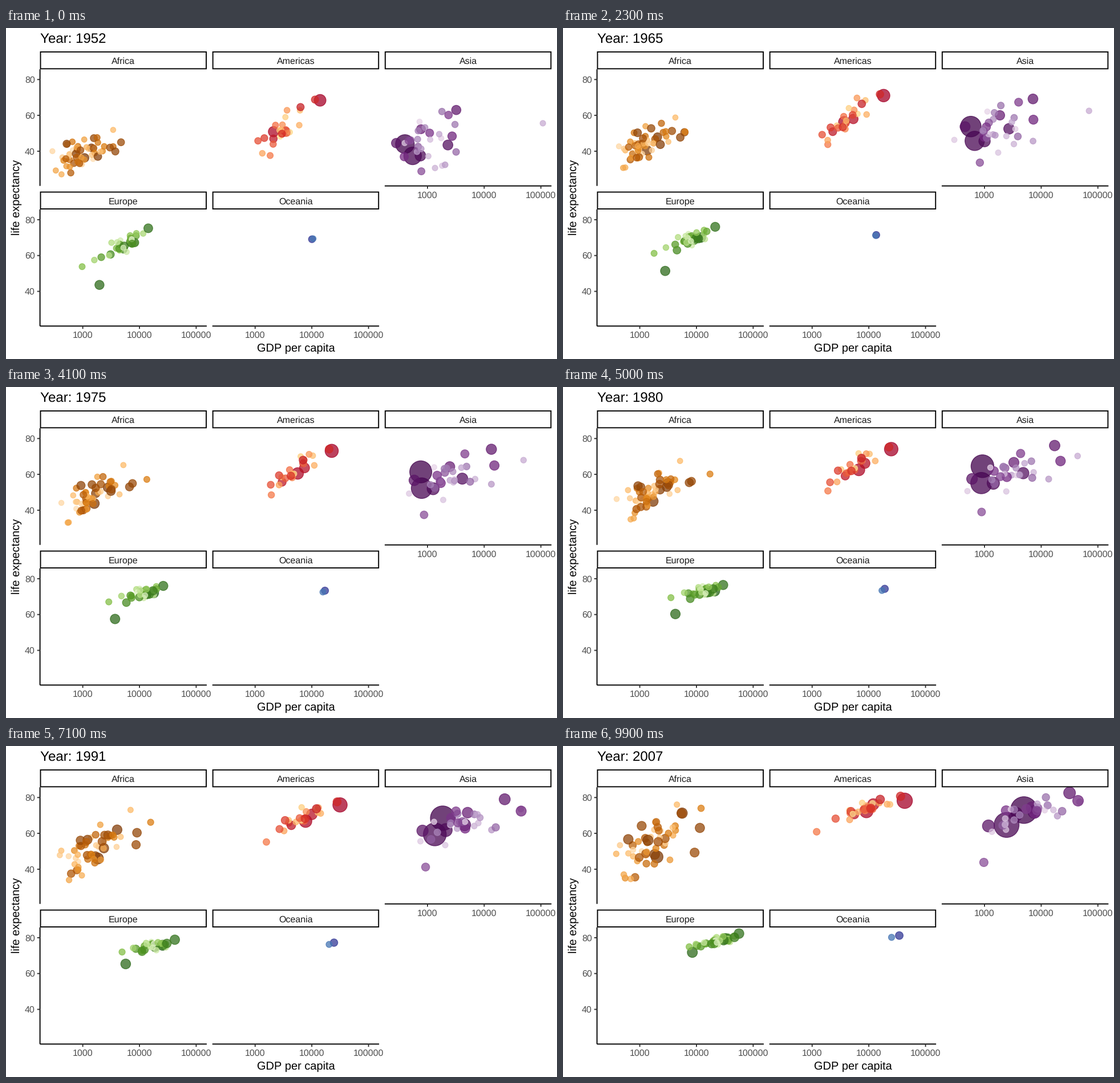
Write a matplotlib script that moves like this. It is 966 by 580 pixels and loops after 10 s.

```python
import numpy as np
import matplotlib.pyplot as plt
from matplotlib.animation import FuncAnimation
from matplotlib.colors import LinearSegmentedColormap
from matplotlib.patches import Rectangle

W, H, DPI = 966, 580, 100
FRAMES, INTERVAL = 100, 100
WAVES = 12                         # one survey every five years
PT = 72 / DPI                      # points per pixel
PANEL_W, PANEL_H, STRIP_H = 292.35, 204.4, 31.4
LINE = 1.9 * PT
ALPHA = 0.74

wave = np.arange(WAVES)
frame_wave = np.linspace(0, WAVES - 1, FRAMES)


def over_waves(values):
    """Spread start, middle and end values over all surveys."""
    return np.interp(wave, np.linspace(0, WAVES - 1, len(values)), values)


def drift(rng, n, keep=0.97):
    """Standard normal scores that wander a little from survey to survey."""
    z = [rng.normal(size=n)]
    for _ in wave[1:]:
        z.append(keep * z[-1] + np.sqrt(1 - keep ** 2) * rng.normal(size=n))
    return np.clip(z, -2.2, 2.2)


def cloud(n, pops, wealth, spread, life, slope, noise, seed):
    """Countries scattered around a moving line of wealth against life."""
    rng = np.random.default_rng(seed)
    pop = rng.permutation(np.geomspace(*pops, n))
    mean, sd, age, rise, rest = (over_waves(v)[:, None]
                                 for v in (wealth, spread, life, slope, noise))
    dx = sd * drift(rng, n)
    years = age + rise * dx + rest * drift(rng, n)
    return pop, np.clip(mean + dx, 2.43, 4.75), np.clip(years, 26, 82.3)


def leader(pop, *points):
    """One large or outlying country: (income, life) at start, middle, end."""
    income, life = zip(*points)
    return pop, over_waves(np.log10(income)), over_waves(life)


def point_size(pop):
    return 2 + 10 * np.sqrt(np.clip(pop - 0.06, 0, None) / 1318)


def px_x(left, log_g):
    return left + 75 + 99.4 * (log_g - 3)


def px_y(top, life):
    return top + 18 + 3.14 * (80 - life)


plt.rcParams.update({"font.family": "Liberation Sans", "text.hinting": "none",
                     "text.hinting_factor": 1})
fig = plt.figure(figsize=(W / DPI, H / DPI), dpi=DPI, facecolor="white")
ax = fig.add_axes([0, 0, 1, 1])
ax.set(xlim=(0, W), ylim=(H, 0))
ax.axis("off")


def text(x, y, s, px, color="black", ha="center", **kw):
    return ax.text(x, y, s, fontsize=px * PT, color=color, ha=ha,
                   va="baseline", **kw)


def line(xs, ys, color="black"):
    ax.plot(xs, ys, color=color, lw=LINE, solid_capstyle="butt", snap=False)


def x_axis(left, bottom):
    line([left, left + PANEL_W], [bottom] * 2)
    for power in (3, 4, 5):
        x = px_x(left, power)
        line([x, x], [bottom, bottom + 4.9], "#333333")
        text(x, bottom + 20.9, str(10 ** power), 15.7, "#4d4d4d")


def y_axis(left, top):
    line([left] * 2, [top, top + PANEL_H])
    for life in (40, 60, 80):
        y = px_y(top, life)
        line([left - 4.9, left], [y, y], "#333333")
        text(left - 8.8, y + 5.6, str(life), 15.7, "#4d4d4d", ha="right")


class Panel:
    def __init__(self, name, col, row, ramp, growth, leaders, crowd=None):
        self.left = 59.6 + 302.17 * col
        self.top = 72.3 + 245.6 * row
        pop, wealth, life = (np.array(v) for v in zip(*leaders))
        wealth, life = wealth.T, life.T
        if crowd:
            pop = np.append(pop, crowd[0])
            wealth = np.hstack([wealth, crowd[1]])
            life = np.hstack([life, crowd[2]])
        self.x = self.tween(px_x(self.left, wealth))
        self.y = self.tween(px_y(self.top, life))
        t = np.linspace(0, 1, FRAMES)[:, None]
        self.size = point_size(pop / growth) * (1 - t) + point_size(pop) * t

        # Shade by population rank, darkest for the largest.
        cmap = LinearSegmentedColormap.from_list(name, ramp.split(), N=1024)
        rank = np.argsort(np.argsort(-pop))
        colors = cmap(rank / (len(pop) - 1))
        colors[:, 3] = ALPHA
        self.dots = ax.scatter(self.x[0], self.y[0], s=1, c=colors,
                               edgecolors=colors, linewidths=1.26 * PT, zorder=3)
        self.dots.set_clip_path(Rectangle((self.left, self.top), PANEL_W, PANEL_H,
                                          transform=ax.transData))
        self.draw_frame(name, col, row)

    @staticmethod
    def tween(values):
        return np.column_stack([np.interp(frame_wave, wave, v) for v in values.T])

    def draw_frame(self, name, col, row):
        ax.add_patch(Rectangle((self.left + 0.9, self.top - STRIP_H + 1),
                               PANEL_W - 1.8, STRIP_H - 1.9, fc="white",
                               ec="black", lw=LINE, zorder=4, snap=False))
        text(self.left + PANEL_W / 2, self.top - 9.2, name, 15.7, "#1a1a1a", zorder=5)
        if col == 0:
            y_axis(self.left, self.top)
        if row == 1 or col == 2:
            x_axis(self.left, self.top + PANEL_H)

    def show(self, f):
        radius = 1.904 * self.size[f] + 0.63
        self.dots.set_offsets(np.column_stack([self.x[f], self.y[f]]))
        self.dots.set_sizes((2 * radius * PT) ** 2)


panels = [
    Panel("Africa", 0, 0, "#7f3b08 #b35806 #e08214 #fdb863 #fee0b6", 3.8,
          [leader(135, (1077, 36.3), (1730, 45.3), (2014, 46.9)),
           leader(80, (1419, 41.9), (3150, 54.9), (5581, 71.3)),
           leader(44, (4725, 45), (8300, 57), (9270, 49.3)),
           leader(6, (2388, 42.7), (19300, 60.2), (12057, 74))],
          cloud(48, (76, 0.2), wealth=(2.98, 3.15, 3.18), spread=(0.27, 0.33, 0.4),
                life=(39, 50, 54.5), slope=(5, 11, 12), noise=(4.6, 5.2, 7.2), seed=4)),
    Panel("Americas", 1, 0, "#a50026 #d73027 #f46d43 #fdae61 #fee090", 2.4,
          [leader(301, (13990, 68.4), (24700, 74.1), (42952, 78.2)),
           leader(190, (2109, 50.9), (6900, 62.5), (9066, 72.4)),
           leader(109, (3478, 50.8), (8700, 66.3), (11978, 76.2)),
           leader(33, (11367, 68.8), (22800, 75.2), (36319, 80.7)),
           leader(8.5, (1840, 37.6), (1950, 50.8), (1202, 60.9))],
          cloud(20, (44, 1), wealth=(3.49, 3.74, 3.92), spread=(0.2, 0.19, 0.23),
                life=(53.5, 65.5, 73.5), slope=(22, 17, 9), noise=(6, 3.8, 2.2), seed=8)),
    Panel("Asia", 2, 0, "#40004b #762a83 #9970ab #c2a5cf #e7d4e8", 2.5,
          [leader(1318, (400, 44), (870, 65), (4959, 73)),
           leader(1110, (547, 37.4), (850, 55.4), (2452, 64.7)),
           leader(223, (750, 37.5), (1400, 55), (3541, 70.7)),
           leader(127, (3217, 63), (18000, 76.3), (31656, 82.6)),
           leader(31.9, (779, 28.8), (890, 39.2), (975, 43.8)),
           leader(2.5, (108382, 55.6), (42000, 70.5), (47307, 77.6))],
          cloud(27, (169, 0.7), wealth=(3.12, 3.55, 3.78), spread=(0.35, 0.46, 0.48),
                life=(47, 62, 71.5), slope=(10, 11, 10), noise=(7.5, 5, 3.5), seed=11)),
    Panel("Europe", 0, 1, "#276419 #4d9221 #7fbc41 #b8e186 #e6f5d0", 1.5,
          [leader(82, (7144, 67.5), (21500, 73), (32170, 79.4)),
           leader(71, (1969, 43.6), (4230, 60.4), (8458, 71.8)),
           leader(4.5, (974, 53.8), (3600, 69.8), (7446, 74.9))],
          cloud(27, (61, 0.3), wealth=(3.71, 4.11, 4.35), spread=(0.23, 0.16, 0.22),
                life=(65.8, 72.8, 77.8), slope=(17, 7, 8), noise=(2.2, 1.4, 1.1), seed=3)),
    Panel("Oceania", 1, 1, "#313695 #4575b4", 2.2,
          [leader(20.4, (10040, 69.1), (19000, 74.2), (34435, 81.2)),
           leader(4.1, (10557, 69.4), (17000, 73.2), (25185, 80.2))]),
]
title = text(59.6, 27, "", 23.6, ha="left")
text(507.9, 566.5, "GDP per capita", 19.6)
text(24, 297.3, "life expectancy", 19.6, rotation=90, rotation_mode="anchor")


def update(f):
    title.set_text(f"Year: {round(1952 + 55 * f / (FRAMES - 1))}")
    for panel in panels:
        panel.show(f)
    return [title] + [p.dots for p in panels]


anim = FuncAnimation(fig, update, frames=FRAMES, interval=INTERVAL,
                     repeat=True, repeat_delay=0)
plt.show()
```
